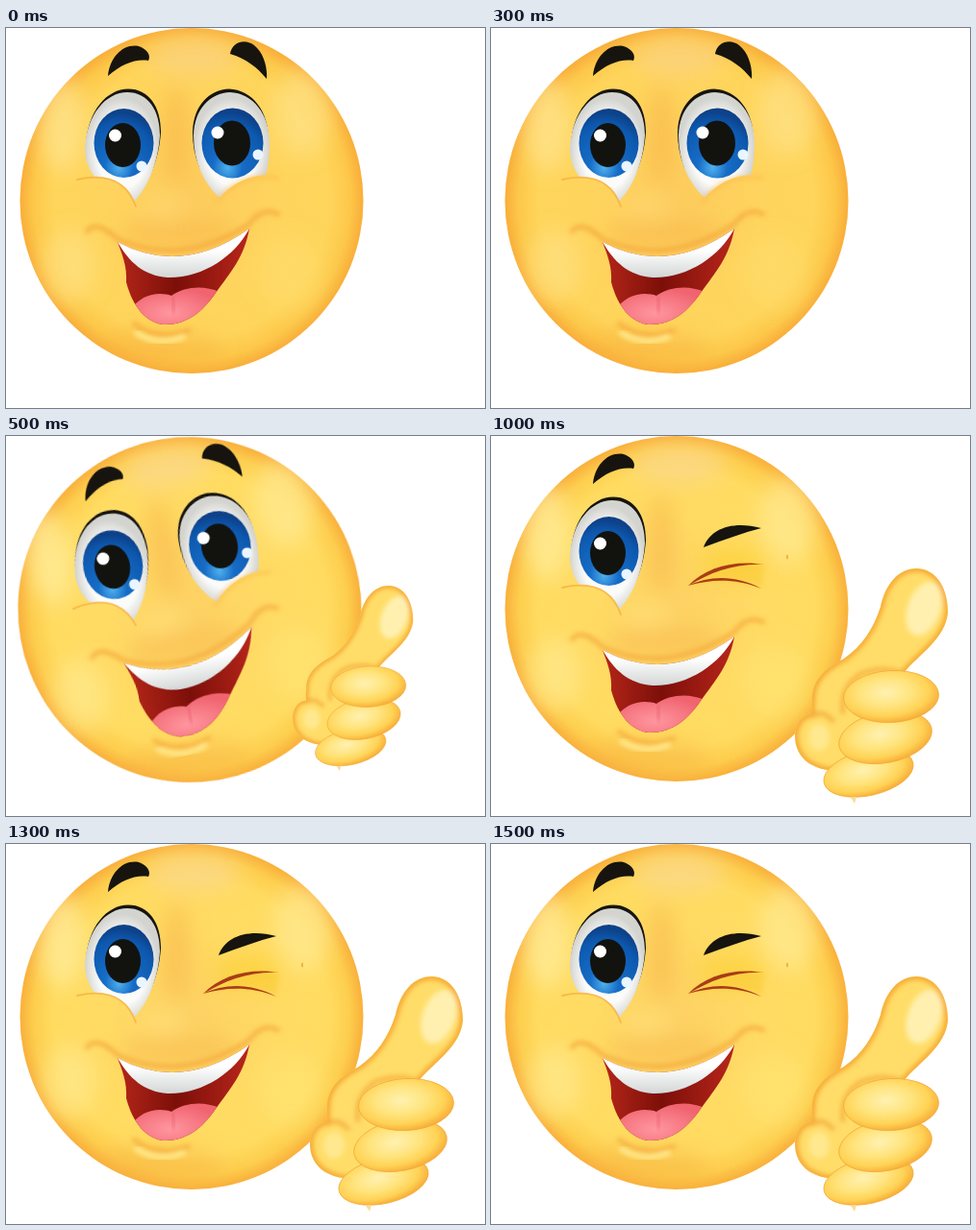
Recreate the animation shown at these times as an HTML page. Size 498 by 396 pixels, loop 2 s.

```html
<!DOCTYPE html>
<html lang="en">
<head>
<meta charset="utf-8">
<title>Winking smiley</title>
<style>
  html, body { margin: 0; width: 100%; height: 100%; overflow: hidden; background: #fff; }
  svg { display: block; width: 100%; height: 100%; }
  .face, .hand, .open, .wink, .warm { animation: 2s step-end infinite; }
  .face { animation-name: tilt; transform-origin: 193px 180px; }
  .hand { animation-name: thumb; transform-origin: 316px 138px; }
  .open { animation-name: open; }
  .wink { animation-name: wink; }
  .warm { animation-name: warm; }
  @keyframes tilt {
    0%, 50% { transform: none; }
    25% { transform: translate(-2px, 1px) rotate(-10deg); }
  }
  @keyframes thumb {
    0% { visibility: hidden; }
    25% { visibility: visible; transform: translate(-18px, 18px) scale(.788); }
    50%, 100% { visibility: visible; transform: none; }
  }
  @keyframes open { 0% { visibility: visible; } 50%, 100% { visibility: hidden; } }
  @keyframes wink { 0% { visibility: hidden; } 50%, 100% { visibility: visible; } }
  @keyframes warm { 0% { opacity: .12; } 25%, 100% { opacity: 0; } }
</style>
</head>
<body>
<svg viewBox="0 0 498 396" preserveAspectRatio="none">
  <defs>
    <radialGradient id="skin">
      <stop offset="0" stop-color="#fdd163"/>
      <stop offset=".5" stop-color="#ffdb64"/>
      <stop offset=".8" stop-color="#ffdc61"/>
      <stop offset=".92" stop-color="#fdce4e"/>
      <stop offset="1" stop-color="#f9b03b"/>
    </radialGradient>
    <radialGradient id="iris" cx=".42" cy=".85" r=".8">
      <stop offset="0" stop-color="#4fb0ee"/>
      <stop offset=".3" stop-color="#166cc6"/>
      <stop offset=".8" stop-color="#0d58ae"/>
      <stop offset="1" stop-color="#0d4189"/>
    </radialGradient>
    <radialGradient id="white" cy=".55">
      <stop offset=".65" stop-color="#fbfbfa"/>
      <stop offset="1" stop-color="#d3d3cf"/>
    </radialGradient>
    <radialGradient id="finger" cx=".45" cy=".42" r=".6">
      <stop offset="0" stop-color="#fff1b0"/>
      <stop offset=".45" stop-color="#ffe47e"/>
      <stop offset=".75" stop-color="#ffd356"/>
      <stop offset="1" stop-color="#f6aa36"/>
    </radialGradient>
    <linearGradient id="teeth" x2="0" y2="1">
      <stop offset=".45" stop-color="#fff"/>
      <stop offset="1" stop-color="#d3d6d6"/>
    </linearGradient>
    <linearGradient id="throat" x2="1">
      <stop offset="0" stop-color="#b52619"/>
      <stop offset=".45" stop-color="#7c0f09"/>
      <stop offset="1" stop-color="#b8261b"/>
    </linearGradient>
    <radialGradient id="tongue" cx=".45" cy=".6" r=".6">
      <stop offset="0" stop-color="#ff969f"/>
      <stop offset="1" stop-color="#f06470"/>
    </radialGradient>
    <filter id="blur" x="-60%" y="-60%" width="220%" height="220%"><feGaussianBlur stdDeviation="11"/></filter>
    <filter id="soft" x="-30%" y="-30%" width="160%" height="160%"><feGaussianBlur stdDeviation="2.5"/></filter>

    <path id="mouth" d="M116 223Q183 259 253 209C248 238 234 254 218 276C204 296 189 309 165 309C146 308 132 291 125 265C126 248 121 237 116 223Z"/>
    <path id="thumb" d="M334 275C333 253 350 241 367 232C386 219 398 200 405 178C410 155 423 138 443 138C465 139 475 161 475 184C472 212 446 226 428 248L430 345L362 349C333 349 316 335 316 312C317 298 325 290 334 290Q333 284 334 275Z"/>
    <path id="leftEye" d="M133 181C128 165 112 155 92 155C85 146 82 136 82 125C84 90 104 67 126 67C148 67 160 86 160 112C158 142 147 166 133 181Z"/>
    <path id="rightEye" d="M222 177C204 160 195 138 195 112C196 84 212 68 233 67C257 68 274 90 274 120Q274 140 270 153C252 154 235 162 222 177Z"/>
    <clipPath id="head"><ellipse cx="193" cy="180" rx="178.5" ry="180"/></clipPath>
    <clipPath id="lips"><use href="#mouth"/></clipPath>
    <clipPath id="fist"><use href="#thumb"/></clipPath>
    <clipPath id="leftLid"><use href="#leftEye"/></clipPath>
    <clipPath id="rightLid"><use href="#rightEye"/></clipPath>
  </defs>

  <g class="face">
    <ellipse cx="193" cy="180" rx="178.5" ry="180" fill="url(#skin)"/>
    <g clip-path="url(#head)">
      <g filter="url(#blur)">
        <ellipse cx="195" cy="30" rx="48" ry="20" fill="#fcd78a" opacity=".8"/>
        <ellipse cx="177" cy="112" rx="14" ry="52" fill="#f9b84c" opacity=".65"/>
        <ellipse cx="180" cy="214" rx="62" ry="15" fill="#f9bc50" opacity=".65"/>
        <ellipse cx="158" cy="336" rx="70" ry="20" fill="#f9b440" opacity=".5"/>
        <ellipse cx="58" cy="100" rx="24" ry="50" fill="#ffec9c" opacity=".75"/>
        <ellipse cx="66" cy="248" rx="28" ry="38" fill="#ffe98e" opacity=".7"/>
        <ellipse cx="308" cy="88" rx="30" ry="46" fill="#ffea94" opacity=".7"/>
        <ellipse cx="295" cy="255" rx="34" ry="40" fill="#ffe576" opacity=".6"/>
        <ellipse cx="163" cy="187" rx="26" ry="15" fill="#ffdf7a" opacity=".7"/>
      </g>
      <ellipse class="warm" cx="193" cy="180" rx="180" ry="182" fill="#f9a532"/>
    </g>

    <g fill="#17140f">
      <path d="M106 50C108 30 122 16 138 19C147 22 151 29 148 34C134 32 120 38 106 50Z"/>
      <path class="open" d="M233 27C235 14 249 11 258 18C268 26 272 41 271 53C261 41 250 32 233 27Z"/>
    </g>

    <use href="#leftEye" transform="translate(1 -3.5)" fill="#17140f"/>
    <use href="#leftEye" fill="url(#white)"/>
    <g clip-path="url(#leftLid)">
      <ellipse cx="122.5" cy="120" rx="31" ry="36" fill="url(#iris)"/>
      <ellipse cx="121.500" cy="122" rx="18.5" ry="23" fill="#12130f"/>
      <circle cx="113.500" cy="112" r="6.500" fill="#fff"/>
      <circle cx="141" cy="144" r="5.500" fill="#eaf6ff"/>
    </g>

    <g class="open">
      <use href="#rightEye" transform="translate(-1 -3.5)" fill="#17140f"/>
      <use href="#rightEye" fill="url(#white)"/>
      <g clip-path="url(#rightLid)">
        <ellipse cx="235.5" cy="120" rx="32" ry="36.500" fill="url(#iris)"/>
        <ellipse cx="235" cy="120" rx="19" ry="23.500" fill="#12130f"/>
        <circle cx="220" cy="109" r="6.500" fill="#fff"/>
        <circle cx="262" cy="132" r="5.500" fill="#eaf6ff"/>
      </g>
      <path d="M219 181C235 160 255 153 284 156" fill="none" stroke="#f9b740" stroke-width="2" filter="url(#soft)"/>
    </g>

    <g fill="none" stroke-linecap="round">
      <path d="M74 158C105 151 126 160 135 186" stroke="#f6ac3c" stroke-width="1.800" opacity=".7"/>
      <g stroke="#f3a338" stroke-width="4" filter="url(#soft)" opacity=".8">
        <path d="M84 212Q94 199 116 220Q182 250 252 205Q267 185 283 194"/>
        <path d="M133 308Q157 328 190 315"/>
      </g>
      <path d="M136 318Q158 332 184 322" stroke="#ffe88c" stroke-width="6" filter="url(#soft)"/>
    </g>

    <use href="#mouth" fill="url(#throat)"/>
    <g clip-path="url(#lips)">
      <path d="M128 296C140 276 160 275 172 279C186 269 206 268 222 275L215 312L140 315Z" fill="url(#tongue)"/>
      <path d="M173 279Q176 287 174 297" fill="none" stroke="#e6566a" stroke-width="2" filter="url(#soft)"/>
    </g>
    <path d="M116 223Q183 259 253 209C238 238 204 261 168 260C143 258 128 244 116 223Z" fill="url(#teeth)"/>

    <g class="wink">
      <ellipse cx="250" cy="132" rx="34" ry="16" fill="#fbd02e" opacity=".6" filter="url(#blur)"/>
      <path d="M221 116C228 96 252 88 281 96C262 101 242 108 221 116Z" fill="#17140f"/>
      <path d="M205 156C225 138 255 131 284 134L281 158C255 147 228 149 205 156Z" fill="#fbcb38" opacity=".6" filter="url(#soft)"/>
      <g fill="#a93c18">
        <path d="M205 156C224 136 254 129 285 134C255 132 228 142 205 156Z"/>
        <path d="M205 156C228 145 255 145 281 159C254 148 229 149 205 156Z"/>
      </g>
      <ellipse cx="308" cy="126" rx="1" ry="2.500" fill="#f3ad3c"/>
    </g>
  </g>

  <g class="hand">
    <use href="#thumb" fill="#ffdd68"/>
    <g clip-path="url(#fist)" fill="none" filter="url(#soft)">
      <use href="#thumb" stroke="#f6aa36" stroke-width="7"/>
      <path d="M335 291Q345 285 357 298M366 290Q362 262 384 248Q407 239 428 247" stroke="#f5ae40" stroke-width="4"/>
      <ellipse cx="341" cy="314" rx="11" ry="14" fill="#ffe88e"/>
      <ellipse cx="450" cy="180" rx="17" ry="29" transform="rotate(20 450 180)" fill="#fff0b0"/>
    </g>
    <g fill="url(#finger)" stroke="#f4ab3a" stroke-width=".8">
      <ellipse cx="392.500" cy="351" rx="47.500" ry="23.500" transform="rotate(-13 392.5 351)"/>
      <ellipse cx="410" cy="314" rx="49" ry="26.500" transform="rotate(-11 410 314)"/>
      <ellipse cx="416" cy="271.500" rx="49.500" ry="27" transform="rotate(-3 416 271.5)"/>
    </g>
    <path d="M374 377L380 376L378 383Z" fill="#fbdc9a"/>
  </g>
</svg>
</body>
</html>
```
